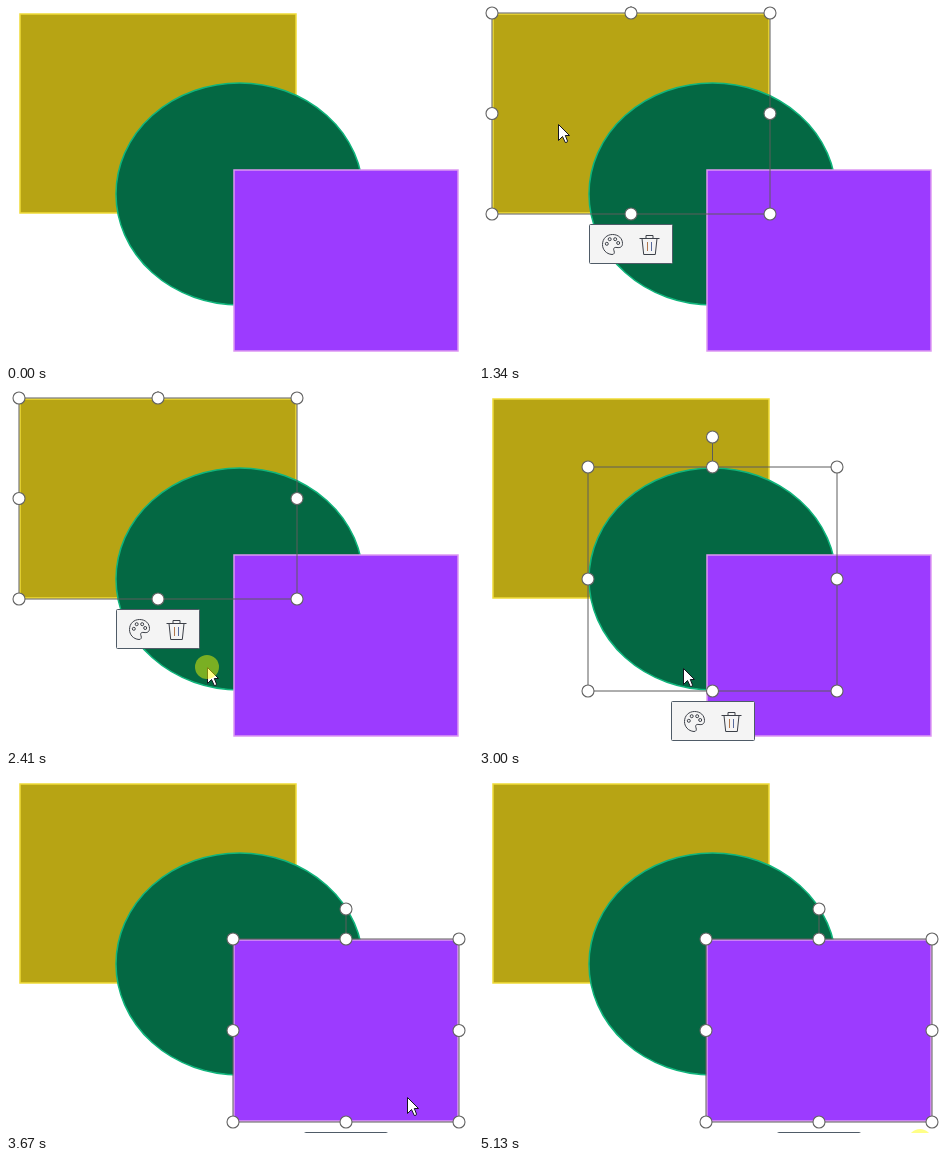
These frames come from a looping animation (467 px wide and 357 px high, 5.21 s). An HTML page:

```html
<!DOCTYPE html>
<html lang="en">
<head>
<meta charset="utf-8">
<title>Selecting shapes</title>
<style>
html, body { margin: 0; width: 100%; height: 100%; overflow: hidden; background: #fff; }
svg { display: block; }
.shape { stroke-width: 1.5; }
.line { fill: none; stroke: #5c5c5c; }
.knob { fill: #fff; stroke: #636363; stroke-width: 1.1; }
.bar { fill: #f4f4f4; stroke: #4f5b67; }
.icon { fill: none; stroke: #3c4048; }
</style>
</head>
<body>
<svg width="467" height="357" viewBox="0 0 467 357">
  <defs>
    <g id="tools">
      <rect class="bar" x=".5" y=".5" width="83" height="39" rx="1"/>
      <g class="icon">
        <path d="M23 30.5C17 30 13.5 25.5 13.5 20.5C13.5 14.5 18 10.5 23.5 10.5C29.5 10.5 33.5 14.5 33.5 19.5C33.5 23 31 24 28 23.5C25 23 24 24.5 25 26.8C25.9 28.8 25 30.6 23 30.5Z"/>
        <circle cx="17.8" cy="19.8" r="1.5"/>
        <circle cx="20.7" cy="15.2" r="1.5"/>
        <circle cx="26.2" cy="15.2" r="1.5"/>
        <circle cx="29.2" cy="19" r="1.5"/>
        <path d="M50.5 14.5H70.5M57 14.5V11.5H64V14.5M53 14.5L54.7 30.5H66.3L68 14.5"/>
        <path stroke="#b0764c" d="M58.5 18V27"/>
        <path stroke="#56699c" d="M62.5 18V27"/>
      </g>
    </g>
  </defs>
  <g id="shapes"></g>
  <g id="picks"></g>
  <g id="pointer">
    <path d="M.5 .5V16.5L4.5 12.5L7.3 18.5H8.7L9.5 17L7.3 11.5H11.5Z" fill="#fff" stroke="#15151f" stroke-linejoin="round"/>
    <circle id="click" r="12" fill="#ff0" fill-opacity=".47"/>
  </g>
</svg>
<script>
const LOOP = 5210, TICK = 67, PRESS = 60;
const $ = id => document.getElementById(id);

// Plays [time, style] steps as hard changes, holding the last to the end.
function play(el, steps) {
  const keys = steps.map(([t, style]) => ({ ...style, offset: t / LOOP, easing: 'step-end' }));
  keys.push({ ...steps[steps.length - 1][1], offset: 1 });
  el.animate(keys, { duration: LOOP, iterations: Infinity });
}

function show(el, ...spans) {
  play(el, [[0, { opacity: 0 }], ...spans.flatMap(([from, to]) =>
    [[from, { opacity: 1 }], [to, { opacity: 0 }]])]);
}

function add(parent, tag, attrs = {}) {
  const el = document.createElementNS('http://www.w3.org/2000/svg', tag);
  for (const name in attrs) el.setAttribute(name, attrs[name]);
  return parent.appendChild(el);
}

// Each box is the selection frame; the shape sits one pixel inside it.
const shapes = [
  { tag: 'rect', box: [13, 7, 291, 208], fill: '#b7a414', stroke: '#f0dc38', click: 1210, tools: 1340 },
  { tag: 'ellipse', box: [109, 76, 358, 300], fill: '#046843', stroke: '#10b57c', click: 2410, tools: 2470 },
  { tag: 'rect', box: [227, 163, 453, 346], fill: '#9c3bff', stroke: '#dd98f2', click: 3540, tools: 3670 },
];

function draw({ tag, box: [x1, y1, x2, y2], fill, stroke }) {
  const w = x2 - x1 - 2, h = y2 - y1 - 2;
  const place = tag === 'rect'
    ? { x: x1 + 1, y: y1 + 1, width: w, height: h }
    : { cx: (x1 + x2) / 2, cy: (y1 + y2) / 2, rx: w / 2, ry: h / 2 };
  add($('shapes'), tag, { class: 'shape', fill, stroke, ...place });
}

// Frame, knobs and toolbar, shown until the next shape is picked.
function pick({ box: [x1, y1, x2, y2], click, tools }, next) {
  const cx = (x1 + x2) / 2, cy = (y1 + y2) / 2, top = y1 - 30;
  const from = click + PRESS, to = next ? next.click + PRESS : LOOP;
  const g = add($('picks'), 'g');
  add(g, 'path', { class: 'line', d: `M${x1} ${y1}H${x2}V${y2}H${x1}ZM${cx} ${y1}V${top}` });
  const knob = (x, y) => add(g, 'circle', { class: 'knob', cx: x, cy: y, r: 6 });
  knob(cx, top);
  for (const y of [y1, cy, y2])
    for (const x of [x1, cx, x2])
      if (x !== cx || y !== cy) knob(x, y);
  const bar = add(g, 'use', { href: '#tools', x: Math.round(cx - 42), y: y2 + 10 });
  show(g, [from, to]);
  show(bar, [tools, to]);
}

shapes.forEach((shape, i) => {
  draw(shape);
  pick(shape, shapes[i + 1]);
});

// The pointer glides from stop to stop: start time, ticks, place.
const stops = [
  [790, 6, 79, 118],
  [1670, 9, 201, 276],
  [3000, 8, 401, 321],
  [4200, 3, 336, 295],
  [4460, 4, 434, 348],
  [4730, 1, 441, 365],
];
const ease = p => p ** 3 * (10 - 15 * p + 6 * p * p);
const at = (x, y) => ({ transform: `translate(${Math.round(x)}px, ${Math.round(y)}px)` });

let [px, py] = [72, 309];
const path = [[0, at(px, py)]];
for (const [start, ticks, x, y] of stops) {
  for (let i = 1; i <= ticks; i++) {
    const p = ease(i / ticks);
    path.push([start + (i - 1) * TICK, at(px + (x - px) * p, py + (y - py) * p)]);
  }
  [px, py] = [x, y];
}
play($('pointer'), path);
show($('pointer'), [790, LOOP]);
show($('click'), ...[...shapes.map(s => s.click), 5130].map(t => [t, Math.min(t + PRESS + 20 * (t > 5000), LOOP)]));
</script>
</body>
</html>
```
